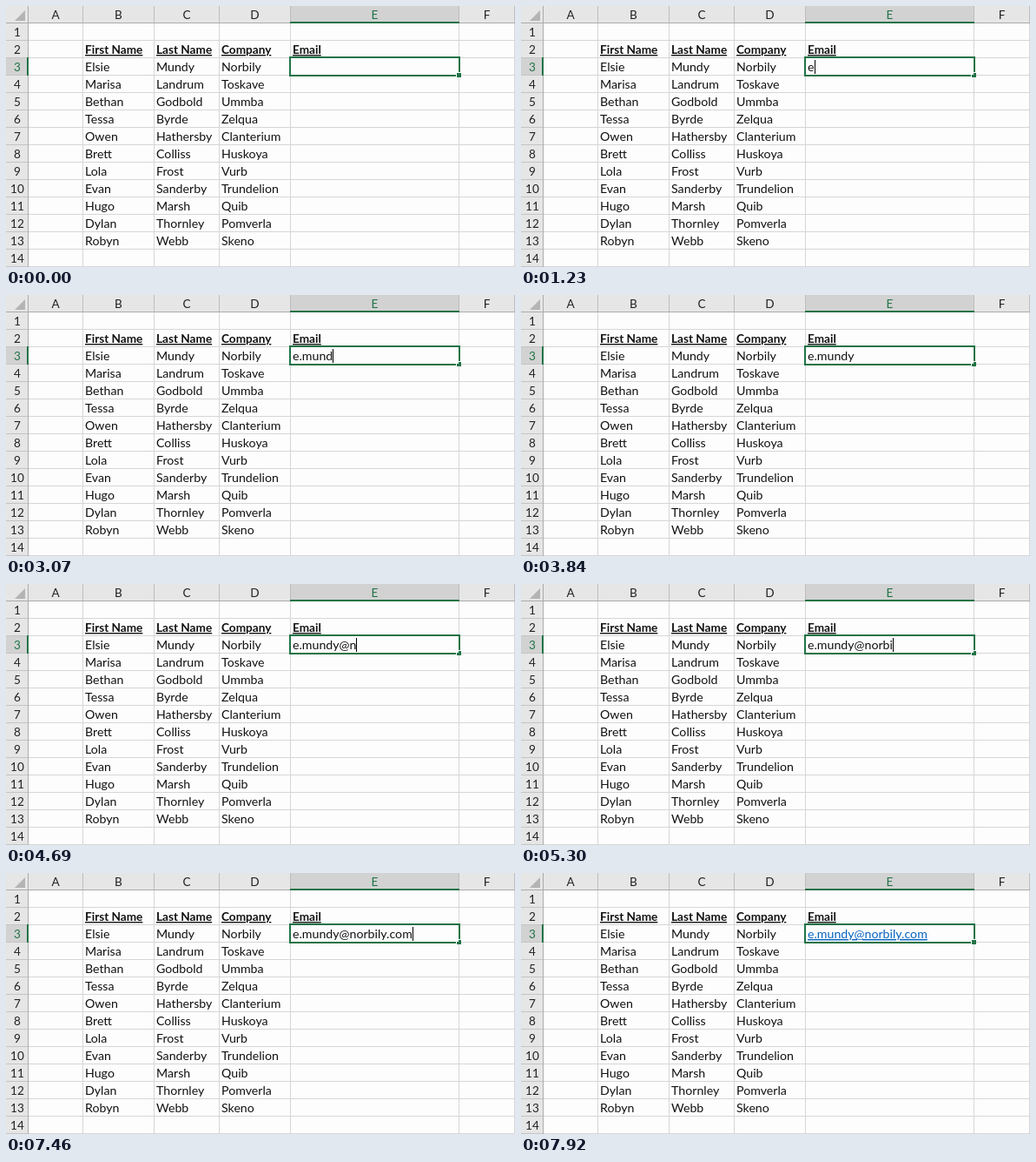
Recreate the animation shown at these times as an HTML page. Size 586 px wide and 300 px high, loop 8000 ms.

```html
<!DOCTYPE html>
<html lang="en">
<head>
<meta charset="utf-8">
<title>Spreadsheet typing</title>
<style>
  html, body { margin: 0; width: 100%; height: 100%; overflow: hidden; background: #fdfdfd; }
  svg { display: block; }
  text { font: 14.2px Lato, Carlito, sans-serif; fill: #111; white-space: pre; }
  .head { font-size: 13.6px; text-anchor: middle; fill: #222; }
  .head.on { fill: #217346; }
  .title { font-size: 13.6px; font-weight: bold; text-decoration: underline; }
  .link { fill: #0563c1; text-decoration: underline; }
</style>
</head>
<body>
<svg id="sheet" width="586" height="300" viewBox="0 0 586 300"></svg>
<script>
const sheet = document.getElementById('sheet');
const GREEN = '#217346', GRID = '#d6d6d6', EDGE = '#ababab', HEAD = '#e6e6e6', ACTIVE = '#d2d2d2';
const cols = [25, 88, 170, 245, 327, 521, 585];
const rowTop = r => r * 20;

function add(tag, attrs, content = '') {
  const el = document.createElementNS('http://www.w3.org/2000/svg', tag);
  for (const key in attrs) el.setAttribute(key, attrs[key]);
  el.textContent = content;
  return sheet.appendChild(el);
}
const box = (x, y, width, height, fill) => add('rect', { x, y, width, height, fill });
const label = (x, y, content, cls = '') => add('text', { x, y, class: cls }, content);

const people = `Elsie Mundy Norbily
Marisa Landrum Toskave
Bethan Godbold Ummba
Tessa Byrde Zelqua
Owen Hathersby Clanterium
Brett Colliss Huskoya
Lola Frost Vurb
Evan Sanderby Trundelion
Hugo Marsh Quib
Dylan Thornley Pomverla
Robyn Webb Skeno`.split('\n').map(line => line.split(' '));

// Grid and headers
box(0, 0, 586, 300, '#fdfdfd');
box(0, 0, 586, 19, HEAD);
box(0, 0, 25, 300, HEAD);
box(328, 0, 193, 19, ACTIVE);
box(0, 60, 25, 19, ACTIVE);
for (const x of cols) {
  box(x, 20, 1, 280, GRID);
  box(x, 0, 1, 19, '#bdbdbd');
}
for (let r = 1; r <= 14; r++) {
  box(26, rowTop(r) + 19, 560, 1, GRID);
  box(0, rowTop(r) + 19, 25, 1, '#c4c4c4');
  label(13, rowTop(r) + 15, r, r === 3 ? 'head on' : 'head');
}
box(0, 19, 586, 1, EDGE);
box(25, 0, 1, 300, EDGE);
box(327, 18, 195, 2, GREEN);
box(24, 59, 2, 21, GREEN);
add('path', { d: 'M10 17H22V5Z', fill: '#b4b4b4' });
[...'ABCDEF'].forEach((letter, i) =>
  label((cols[i] + cols[i + 1]) / 2 + 0.5, 15, letter, letter === 'E' ? 'head on' : 'head'));

// Table
['First Name', 'Last Name', 'Company', 'Email'].forEach((name, i) =>
  label(cols[i + 1] + 3, 55, name, 'title'));
people.forEach((person, r) => person.forEach((word, c) =>
  label(cols[c + 1] + 3, rowTop(r + 3) + 15, word)));

// Selected cell
add('rect', { x: 327, y: 59, width: 195, height: 21, fill: 'none', stroke: GREEN, 'stroke-width': 2 });
box(518, 76, 6, 6, '#fdfdfd');
box(519, 77, 5, 5, GREEN);
const editor = box(328, 60, 193, 19, '#fdfdfd');
const entry = label(330, 75, '');
const caret = box(330, 62, 1, 16, '#000');

const email = 'e.mundy@norbily.com';
const keys = [1230, 1460, 1920, 2300, 2760, 3070, 3460, 4300, 4610, 4760,
  4920, 5070, 5300, 5610, 5920, 6300, 6690, 7000, 7460];
const ENTER = 7840, LOOP = 8000;

function draw(now) {
  const t = now % LOOP;
  const typed = keys.filter(k => k <= t).length;
  const done = t >= ENTER;
  const editing = typed > 0 && !done;
  const blink = t >= 3840 && t < 4300;
  entry.textContent = email.slice(0, typed);
  entry.setAttribute('class', done ? 'link' : '');
  editor.setAttribute('visibility', editing ? 'visible' : 'hidden');
  caret.setAttribute('visibility', editing && !blink ? 'visible' : 'hidden');
  if (editing) caret.setAttribute('x', Math.round(330 + entry.getComputedTextLength()));
  requestAnimationFrame(draw);
}
draw(performance.now());
</script>
</body>
</html>
```
